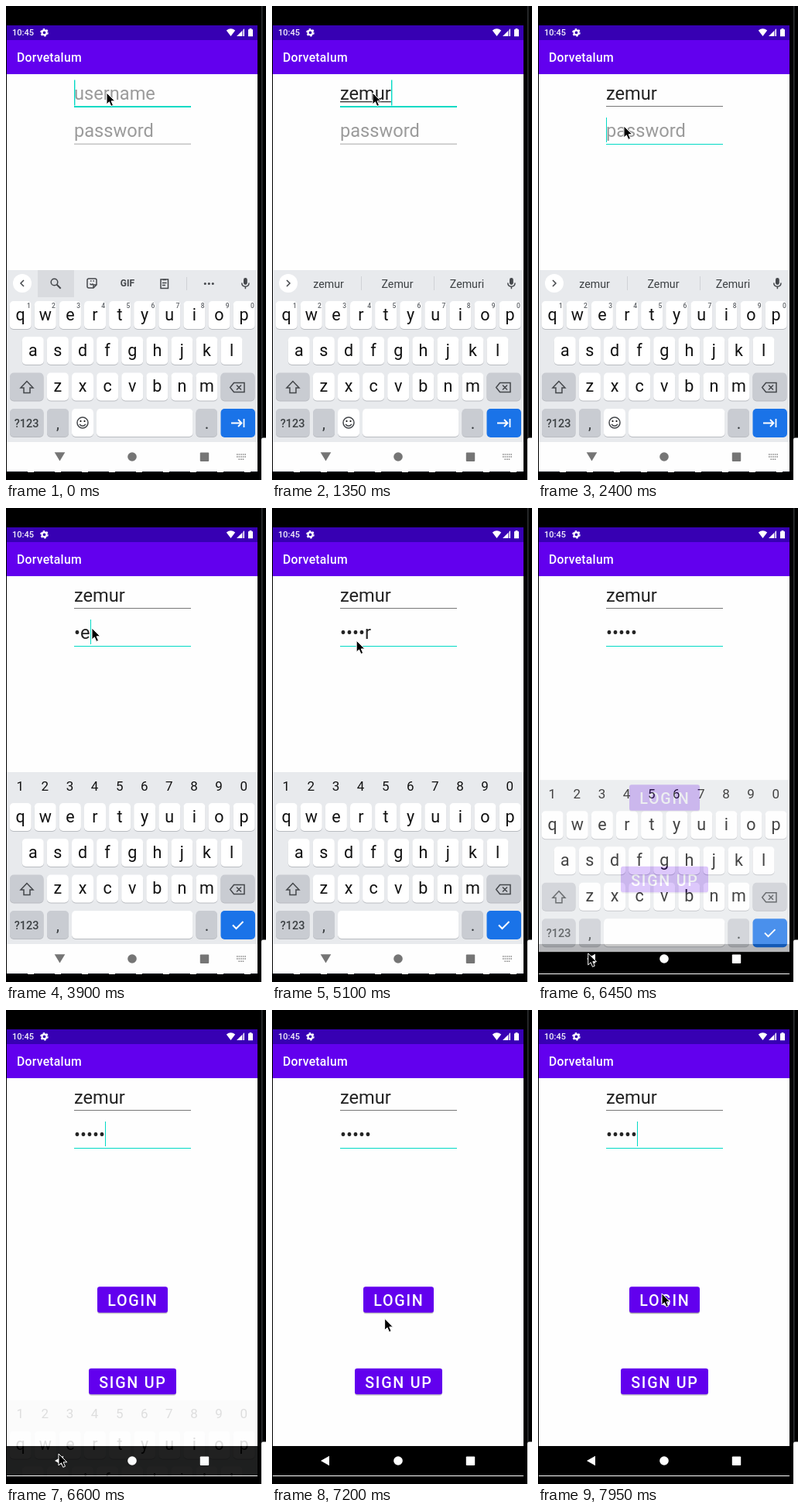
Recreate the animation shown at these times as an HTML page. Size 336x612 px, loop 8 s.

```html
<!DOCTYPE html>
<html lang="en">
<head>
<meta charset="utf-8">
<title>Sign-in screen</title>
<style>
  html, body { margin: 0; width: 100%; height: 100%; overflow: hidden; background: #000; }
  svg { display: block; width: 100vw; height: 100vh; font-family: Roboto, "Noto Sans", sans-serif; }
  .mid { text-anchor: middle; }
  .med { font-weight: 500; }
  .line { fill: none; stroke: #44474b; stroke-width: 1.5; }
  .key { fill: #fff; }
  .dim { fill: #c9ccd2; }
</style>
</head>
<body>
<svg id="stage" viewBox="0 0 336 612">
  <defs><clipPath id="screen"><rect x="1" y="25" width="324" height="577"/></clipPath></defs>
  <rect width="336" height="612"/>
  <rect x="330" width="1.5" height="560" fill="#303234"/>
  <path d="M330 612V560q0-2.500 2.500-2.500h3.500v54.500z" fill="#fff"/>

  <g clip-path="url(#screen)">
    <rect x="1" y="25" width="324" height="577" fill="#fefefe"/>
    <rect x="1" y="44" width="324" height="44" fill="#6200ee"/>
    <rect x="1" y="25" width="324" height="19" fill="#3700b3"/>
    <g fill="#fff">
      <text x="8" y="38.3" font-size="11" class="med" fill-opacity=".95">10:45</text>
      <circle cx="49.5" cy="34.3" r="3" fill="none" stroke="#fff" stroke-width="2.2"/>
      <circle cx="49.5" cy="34.3" r="4.6" fill="none" stroke="#fff" stroke-width="1.4" stroke-dasharray="2.4 2.42"/>
      <path d="M284.8 31.6q5.7-4.6 11.4 0L290.500 39z"/>
      <path d="M308 29.200V39h-9.800z" fill-opacity=".45"/>
      <path d="M305 32.200V39h-6.800z"/>
      <path d="M308 29.200V39h-1.200v-8.600z"/>
      <path d="M313 30.300h1.600v-1.300h2.800v1.300h1.600V39.300h-6z"/>
      <text x="14" y="72" font-size="15.76" letter-spacing=".25" class="med">Dorvetalum</text>
    </g>

    <g id="buttons" fill="#fff" font-size="19.7" class="med" letter-spacing="1.76"></g>

    <g font-size="23.64">
      <rect id="userLine" x="88" width="151"/>
      <rect id="passLine" x="88" width="151"/>
      <text id="user" x="88" y="121"></text>
      <text id="pass" x="88" y="169"></text>
      <rect id="compose" x="88" y="123" height="1.3" fill="#333"/>
      <rect id="caret" fill="#03dac5"/>
    </g>

    <g id="darkNav">
      <rect x="1" y="563" width="324" height="38"/>
      <g fill="#fff">
        <path d="M63 582l11-6.300v12.600z"/>
        <circle cx="163" cy="582" r="5.800"/>
        <rect x="250.800" y="576.500" width="11.400" height="11.400" rx="1"/>
      </g>
    </g>

    <g id="keyboard">
      <rect x="1" y="341" width="324" height="222" fill="#e8eaed"/>
      <g id="keys"></g>

      <g id="tools">
        <rect x="41" y="341" width="47" height="35" fill="#d9dbdf"/>
        <circle cx="21" cy="358" r="12" fill="#fff"/>
        <g class="line">
          <path d="M23 354l-4 4 4 4"/>
          <circle cx="62.500" cy="356.500" r="4.300"/>
          <path d="M65.700 359.700l5 5" stroke-width="2"/>
          <path d="M113 364h-6q-2 0-2-2v-8q0-2 2-2h8q2 0 2 2v6zM113 364v-4h4M108.500 358.500q2 2.500 4 0"/>
          <path d="M200 353h9.500v11.500h-9.500z"/>
          <path d="M202.500 353.500h4.500M202 357.500h5.500M202 360.500h4" stroke-width="1.600"/>
        </g>
        <path d="M109 355h1.500M112.500 355h1.500" stroke="#44474b" stroke-width="1.500"/>
        <rect x="233" y="350" width="1" height="17" fill="#cfd1d5"/>
        <text x="157" y="362.300" font-size="12" font-weight="700" class="mid" fill="#44474b">GIF</text>
        <g fill="#44474b">
          <circle cx="257.300" cy="358.500" r="1.500"/><circle cx="262.300" cy="358.500" r="1.500"/><circle cx="267.300" cy="358.500" r="1.500"/>
        </g>
      </g>

      <g id="words">
        <circle cx="21" cy="358" r="12" fill="#fff"/>
        <path class="line" d="M19 354l4 4-4 4"/>
        <path d="M115.500 349v18M209.500 349v18" stroke="#d0d2d6"/>
        <g id="hints" font-size="14.200" fill="#3c4043" class="mid">
          <text x="73" y="363.500"></text><text x="162" y="363.500"></text><text x="252" y="363.500"></text>
        </g>
      </g>

      <g id="mic">
        <rect x="307" y="351" width="4.800" height="9" rx="2.400" fill="#44474b"/>
        <path class="line" d="M304.800 357.500q0 4.700 4.600 4.700t4.600-4.700M309.400 362v3.200"/>
      </g>
      <g id="digits" font-size="17" fill="#111" class="mid"></g>
    </g>

    <g id="lightNav" fill="#757575">
      <rect x="1" y="563" width="324" height="39" fill="#fefefe"/>
      <path d="M1 601.500h324" stroke="#10131c" stroke-dasharray="27 8"/>
      <path d="M62.700 576.300h13.600l-6.800 11.200z"/>
      <circle cx="163" cy="582" r="5.800"/>
      <rect x="250.800" y="576.500" width="11.400" height="11.400" rx="1"/>
      <path d="M298 579h12M298 582h12M300.500 585.200h7" stroke="#8a8a8a" stroke-width="1.600" stroke-dasharray="1.600 1"/>
    </g>
  </g>

  <path id="mouse" d="M0 0V15l3.400-3.200 2.400 5.600 2.700-1.200-2.400-5.400h4.700z" fill="#000" stroke="#fff" stroke-width="1"/>
</svg>

<script>
const LOOP = 8000, STEP = 150;
const NAME = "zemur";
const PITCH = 32.1;
const $ = id => document.getElementById(id);
const set = (el, attrs) => { for (const k in attrs) el.setAttribute(k, attrs[k]); };
const show = (el, on) => set(el, { display: on ? "inline" : "none" });

const userKeys = [300, 600, 900, 1050, 1350];
const passKeys = [3600, 3900, 4200, 4350, 4650];
const caretStarts = [0, ...userKeys, 2400, ...passKeys.slice(0, 4), 4600];
const FOCUS = 2400, DIGITS = 2550, MASK = 6150, HIDE = 6400, HOVER = 7650;

// time, x, y of the pointer tip
const route = [
  [0, 130, 112], [1400, 130, 112], [2300, 111, 155], [5000, 111, 155],
  [5850, 63, 576], [6350, 63, 576], [6600, 68, 573], [7400, 160, 366], [LOOP, 160, 366]
];

function keyBox(x, y, w, cls) {
  return `<rect x="${x}" y="${y + 1}" width="${w}" height="36" rx="5" fill="#b9bcc1"/>` +
    `<rect class="${cls}" x="${x}" y="${y}" width="${w}" height="36" rx="5"/>`;
}

function letterRow(letters, x, y) {
  return [...letters].map((c, i) => {
    const cx = x + i * PITCH;
    return keyBox(cx - 14, y, 28, "key") +
      `<text class="mid" x="${cx}" y="${y + 24.5}" font-size="21.5" fill="#111">${c}</text>`;
  }).join("");
}

function buildKeys() {
  const nums = [..."1234567890"];
  const topHints = nums.map((n, i) =>
    `<text x="${29.4 + i * PITCH}" y="390" font-size="8.5">${n}</text>`).join("");
  $("keys").innerHTML =
    letterRow("qwertyuiop", 18.7, 381) + letterRow("asdfghjkl", 34.8, 427) + letterRow("zxcvbnm", 66.9, 473.5) +
    keyBox(5, 473.5, 43.5, "dim") + keyBox(277.5, 473.5, 44, "dim") +
    keyBox(5, 520, 43.5, "dim") + keyBox(53, 520, 28, "dim") + keyBox(245.5, 520, 27.5, "dim") +
    `<rect x="277.5" y="520" width="44.500" height="37" rx="5" fill="#1a73e8"/>
     <path class="line" d="M27 484.500l-8 8.500h4v6.500h8v-6.500h4z"/>
     <path class="line" d="M294.500 486.500h13.500v12h-13.500l-4.800-6zM298 489.500l6 6M304 489.500l-6 6"/>
     <g class="mid med" fill="#3c4043">
       <text x="26.700" y="543.500" font-size="14.500">?123</text>
       <text x="67" y="546" font-size="18">,</text><text x="259.500" y="546" font-size="18">.</text>
     </g>
     <g id="textKeys">
       <g class="mid med" fill="#5f6368">${topHints}</g>
       ${keyBox(85, 520, 28, "key")}${keyBox(117, 520, 124.5, "key")}
       <g class="line"><circle cx="99" cy="538" r="7"/><path d="M95 540q4 4.500 8 0"/></g>
       <circle cx="96.500" cy="536" r="1.100"/><circle cx="101.500" cy="536" r="1.100"/>
       <path d="M291 538.500h13M300 534l4.500 4.500-4.500 4.500M307.500 533v11" fill="none" stroke="#fff" stroke-width="1.800"/>
     </g>
     <g id="passKeys">
       ${keyBox(85, 520, 156.5, "key")}
       <path d="M293 538.500l4.500 4.500 9-9" fill="none" stroke="#fff" stroke-width="2"/>
     </g>`;
  $("digits").innerHTML = nums.map((n, i) =>
    `<text x="${18.3 + i * PITCH}" y="364.500">${n}</text>`).join("");
}

function buildButtons() {
  const button = (x, y, w, tx, label, id) =>
    `<rect id="${id}" x="${x}" y="${y + 1.5}" width="${w}" height="33.500" rx="3.500" fill="#000" opacity=".22"/>
     <rect x="${x}" y="${y}" width="${w}" height="33.500" rx="3" fill="#6200ee"/>
     <text x="${tx}" y="${y + 24.8}">${label}</text>`;
  $("buttons").innerHTML =
    button(118, 357.3, 91, 131.2, "LOGIN", "loginShade") +
    button(107, 462.8, 113, 120.2, "SIGN UP", "signShade");
}

function pointer(t) {
  const i = route.findIndex((p, n) => n > 0 && t <= p[0]);
  const [t0, x0, y0] = route[i - 1], [t1, x1, y1] = route[i];
  const p = (t - t0) / (t1 - t0), e = p * p * (3 - 2 * p);
  return [x0 + (x1 - x0) * e, y0 + (y1 - y0) * e];
}

const typed = (keys, t) => keys.filter(k => k <= t).length;

function masked(n, t) {
  const hidden = t >= MASK ? n : Math.max(0, n - 1);
  return "•".repeat(hidden) + NAME.slice(hidden, n);
}

function drawFields(t) {
  const onPass = t >= FOCUS;
  const n = typed(userKeys, t), m = typed(passKeys, t);
  const user = $("user"), pass = $("pass");
  user.textContent = n ? NAME.slice(0, n) : "username";
  pass.textContent = m ? masked(m, t) : "password";
  set(user, { fill: n ? "#242424" : "#9b9b9b" });
  set(pass, { fill: m ? "#242424" : "#9b9b9b" });
  set($("userLine"), { y: 129, height: onPass ? 1 : 2, fill: onPass ? "#777" : "#03dac5" });
  set($("passLine"), onPass
    ? { y: 178, height: 1, fill: "#03dac5" }
    : { y: 177.5, height: 1.5, fill: "#c4c4c4" });

  const userWidth = n ? user.getComputedTextLength() : 0;
  const passWidth = m ? pass.getComputedTextLength() : 0;
  set($("compose"), { width: onPass ? 0 : userWidth });

  const since = t - caretStarts.filter(s => s <= t).pop();
  show($("caret"), since % 1000 < 500);
  set($("caret"), onPass
    ? { x: Math.round(88 + passWidth), y: 144, width: 1, height: 32 }
    : { x: Math.round(88 + userWidth), y: 95.5, width: 1.4, height: 33 });
}

function drawKeyboard(t) {
  const digits = t >= DIGITS, suggesting = t >= userKeys[0] && !digits;
  show($("tools"), t < userKeys[0]);
  show($("words"), suggesting);
  show($("mic"), !digits);
  show($("digits"), digits);
  show($("textKeys"), !digits);
  show($("passKeys"), digits);

  if (suggesting) {
    // early suggestions trail the typing by one step
    const n = t >= 900 ? typed(userKeys, t) : Math.max(1, typed(userKeys, t - STEP));
    const word = NAME.slice(0, n), cap = word[0].toUpperCase() + word.slice(1);
    [word, cap, cap + (n === 5 ? "i" : "e")].forEach((s, i) => $("hints").children[i].textContent = s);
  }

  const p = Math.min(1, Math.max(0, (t - HIDE) / 230));
  set($("keyboard"), { transform: `translate(0 ${215 * p * p})`, opacity: 1 - p });
  show($("keyboard"), p < 1);
  show($("lightNav"), t < HIDE);
  show($("darkNav"), t >= HIDE);
}

function draw(time) {
  const t = Math.floor((time % LOOP) / STEP) * STEP;
  drawFields(t);
  drawKeyboard(t);
  set($("loginShade"), { opacity: t >= HOVER ? .32 : .22 });
  set($("mouse"), { transform: `translate(${pointer(t)})` });
}

buildKeys();
buildButtons();
const start = performance.now();
function tick() {
  draw(performance.now() - start);
  requestAnimationFrame(tick);
}
tick();
</script>
</body>
</html>
```
